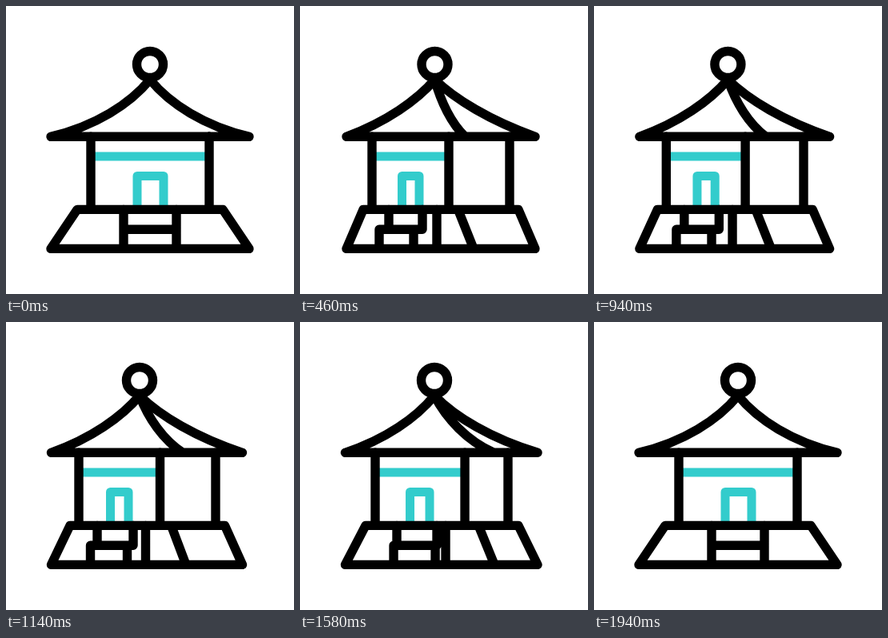
Write an HTML page that moves like this. It is 360 px wide and 360 px high and loops after 2.4 s.

```html
<!DOCTYPE html>
<html lang="en">
<head>
<meta charset="utf-8">
<title>Turning pavilion</title>
<style>
  html, body { margin: 0; width: 100%; height: 100%; overflow: hidden; background: #fff; }
  svg { display: block; width: 100vw; height: 100vh; }
  path, circle { fill: none; stroke: #000; stroke-width: 11.4; stroke-linecap: round; stroke-linejoin: round; }
  .accent { stroke: #33cccc; stroke-width: 11; stroke-linecap: butt; }
</style>
</head>
<body>
<svg viewBox="0 0 360 360">
  <path id="trim" class="accent"/>
  <path id="roof"/>
  <path id="walls"/>
  <path id="base"/>
  <path id="steps"/>
  <circle id="ball" cy="73" r="16.5"/>
</svg>
<script>
const LOOP = 2400;
const TOP = 92, EAVES = 163.3, FLOOR = 254.4, STEP = 279.2, GROUND = 303.4;
const times = [0, 260, 460, 740, 1140, 1580, 1940];

// x positions at each time; the last pose repeats the first
const tracks = {
  apex:     [180, 174, 168.5, 168, 167, 168],
  left:     [56, 57.5, 58, 57.5, 56.5, 56.5],
  right:    [304, 298, 294, 294, 295.5, 297],
  hip:      [304, 245, 206.5, 210.5, 221, 242],
  colL:     [106, 97, 90, 90, 91, 94],
  colM:     [254, 214, 186, 187, 192.5, 206],
  colR:     [254, 259, 262, 262, 262, 260],
  doorL:    [164, 142.5, 127.5, 128, 130.5, 137.5],
  doorR:    [197, 168.5, 149, 150, 153, 162],
  baseL:    [89, 84, 79, 79, 80, 82],
  baseM:    [271, 229, 197.5, 199, 206.5, 223],
  footM:    [304, 252, 217, 219, 225, 243],
  baseR:    [271, 273, 273, 273, 273.5, 273],
  lowL:     [147, 119, 99, 101, 105.5, 117],
  lowR:     [213, 171, 142, 144, 151.5, 169],
  highL:    [147, 126, 111, 112, 114, 121],
  highR:    [213, 182, 153, 154.5, 159, 171],
  sideWall: [213, 188, 171, 172, 174.5, 182]
};

// Smooth curve through the keys, without overshoot, at rest at both ends
function makeCurve(keys) {
  const v = [...keys, keys[0]];
  const rate = i => (v[i + 1] - v[i]) / (times[i + 1] - times[i]);
  const slope = v.map((_, i) => {
    if (i === 0 || i === v.length - 1) return 0;
    const a = rate(i - 1), b = rate(i);
    return a * b > 0 ? 2 * a * b / (a + b) : 0;
  });
  return t => {
    if (t >= times[times.length - 1]) return v[0];
    let i = 0;
    while (t >= times[i + 1]) i++;
    const span = times[i + 1] - times[i];
    const u = (t - times[i]) / span, w = 1 - u;
    return w * w * ((1 + 2 * u) * v[i] + u * span * slope[i])
         + u * u * ((3 - 2 * u) * v[i + 1] - w * span * slope[i + 1]);
  };
}

const curves = Object.entries(tracks).map(([name, keys]) => [name, makeCurve(keys)]);
const el = id => document.getElementById(id);
const draw = (id, d) => el(id).setAttribute('d', d);
const post = (x, top, bottom) => `M${x} ${top}V${bottom}`;

// Roof edge from the apex to the eaves; bend 0 is a straight line
function ridge(apex, end, bend) {
  const control = (part, sag) =>
    `${apex + (end - apex) * part} ${TOP + (EAVES - TOP) * part + sag * bend}`;
  return `M${apex} ${TOP}C${control(0.2, 16)} ${control(0.55, 19)} ${end} ${EAVES}`;
}

function render(t) {
  const p = Object.fromEntries(curves.map(([name, at]) => [name, at(t)]));
  const turn = (p.right - p.hip) / 88;
  el('ball').setAttribute('cx', p.apex);
  draw('trim', `M${p.colL} 188H${p.colM}M${p.doorL} ${FLOOR}V212.5H${p.doorR}V${FLOOR}`);
  draw('roof', ridge(p.apex, p.left, 1 - 0.28 * turn) +
    ridge(p.apex, p.hip, 1 - 0.15 * turn) +
    ridge(p.apex, p.right, 1 - 0.37 * turn) +
    `M${p.left} ${EAVES}H${p.right}`);
  draw('walls', [p.colL, p.colM, p.colR].map(x => post(x, EAVES, FLOOR)).join(''));
  draw('base', `M${p.left} ${GROUND}L${p.baseL} ${FLOOR}H${p.baseR}L${p.right} ${GROUND}Z` +
    `M${p.baseM} ${FLOOR}L${p.footM} ${GROUND}`);
  draw('steps', `M${p.highL} ${FLOOR}V${STEP}` +
    `M${p.lowL} ${GROUND}V${STEP}H${p.highR}V${FLOOR}` +
    post(p.lowR, STEP, GROUND) + post(p.sideWall, FLOOR, GROUND));
}

const start = performance.now();
function tick() {
  render((performance.now() - start) % LOOP);
  requestAnimationFrame(tick);
}
tick();
</script>
</body>
</html>
```
